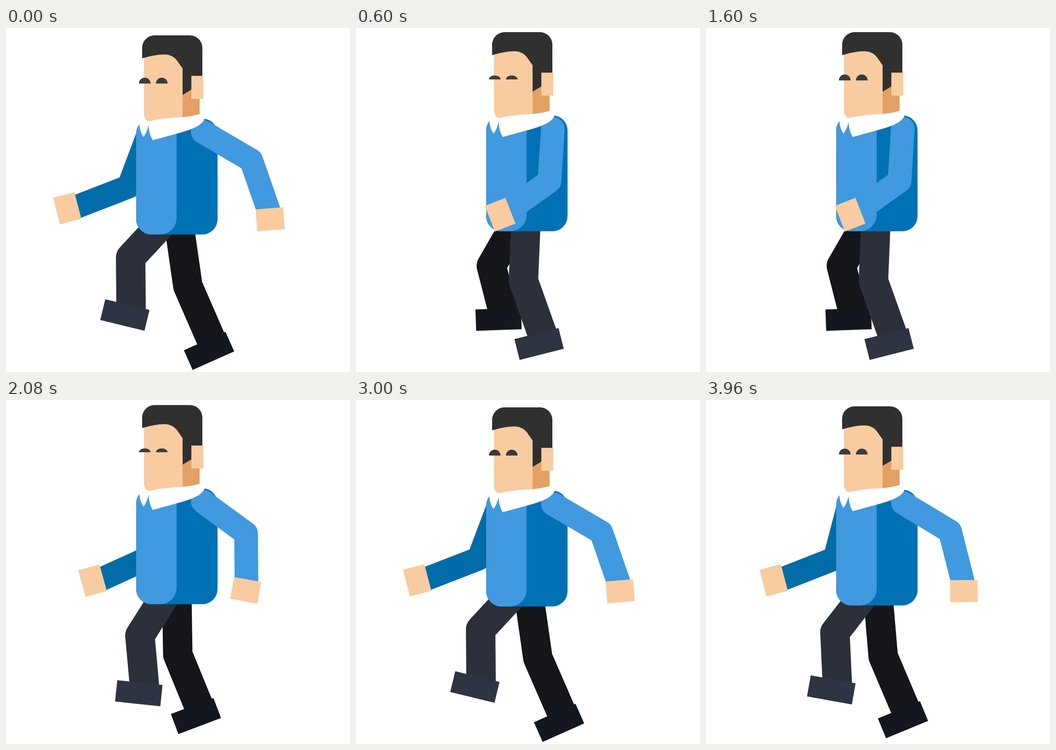
An HTML page for the animation above (4 s loop, 748 by 748 pixels).

```html
<!DOCTYPE html>
<html lang="en">
<head>
<meta charset="utf-8">
<title>Walk cycle</title>
<style>
  html, body { margin: 0; width: 100%; height: 100%; overflow: hidden; background: #fff; }
  svg { display: block; width: 100%; height: 100%; }
  .limb { fill: none; stroke-linejoin: round; }
  .leg { stroke-width: 64px; }
  .arm { stroke-width: 51.5px; stroke-linecap: round; }
  .skin { fill: #f8cca0; }
  .eye { fill: #3b3b3b; }
</style>
</head>
<body>
<svg viewBox="0 0 748 748">
  <path id="farArm" class="limb arm" stroke="#006da8"/>
  <rect id="farHand" class="skin" x="-30" y="-24" width="60" height="48"/>

  <path id="farLeg" class="limb leg" stroke="#15161a"/>
  <rect id="farFoot" x="-49.5" y="-23.3" width="99" height="46.6" fill="#131820"/>
  <path id="nearLeg" class="limb leg" stroke="#2b303b"/>
  <rect id="nearFoot" x="-49.5" y="-23.3" width="99" height="46.6" fill="#2f3442"/>

  <g id="torso">
    <rect x="283" y="197" width="177" height="252" rx="33" fill="#0071b5"/>
    <path fill="#4199df" d="M283 230a33 33 0 0 1 33-33H371V413a36 36 0 0 1-36 36H316a33 33 0 0 1-33-33Z"/>
  </g>

  <path id="nearArm" class="limb arm" stroke="#4199df"/>
  <rect id="nearHand" class="skin" x="-30" y="-24" width="60" height="48"/>

  <g id="head">
    <path fill="#e3a063" d="M382 120H421V192L382 200Z"/>
    <path class="skin" d="M300 50H384V198L312 206Q300 199 300 186Z"/>
    <path fill="#303030" d="M296 66V43a27 27 0 0 1 27-27H400a27 27 0 0 1 27 27V106H403V134L384 145.5V88L372 71Q362 57.5 344 57.5Q324 57.5 296 66Z"/>
    <rect class="skin" x="403" y="104" width="26" height="50"/>
    <g id="eyes">
      <path class="eye" d="M289 6.4a12.7 12.8 0 0 1 25.4 0Z"/>
      <path class="eye" d="M326 6.4a12.7 12.8 0 0 1 25.4 0Z"/>
    </g>
    <path fill="#fff" d="M300 196L309 203Q345 195 384 194Q405 192 421 187L431 195Q433 200 424 208Q412 219 372 229.5L319 244Q311 232 310 211Q307 226 299 237Q291 226 290 209Z"/>
  </g>
</svg>
<script>
const LOOP = 4000, CYCLE = 1000, STEP = 40;
const STRIDE = 480, BOB = 15, RAD = Math.PI / 180;

// Each limb swings between two extreme poses; feet and hands are x, y, degrees.
const legs = {
  near: { foot: [[258.5, 624, 13.5], [440, 706, -19]], knee: [[271, 499], [392, 560]] },
  far:  { foot: [[441.5, 702, -24], [270.5, 613, 8]], knee: [[395.4, 561], [264, 499]] }
};
const arms = {
  near: { shoulder: [428, 226], length: 114, angle: [59.6, -3.6], ease: 1.5,
          hand: [[574.5, 416, -4.5], [313.5, 406, 68.6]], wrist: -2 },
  far:  { shoulder: [312, 225], length: 120, angle: [-20.6, 64], ease: 0.9,
          hand: [[133, 392, 75.5], [403, 396, 71]], wrist: 2 }
};

const $ = id => document.getElementById(id);
const mix = (a, b, u) => a + (b - a) * u;
const blend = ([a, b], u) => a.map((v, i) => mix(v, b[i], u));

const line = (id, ...pts) =>
  $(id).setAttribute('d', 'M' + pts.map(p => p[0].toFixed(2) + ' ' + p[1].toFixed(2)).join('L'));
const place = (id, x, y, r = 0) =>
  $(id).setAttribute('transform', `translate(${x} ${y}) rotate(${r})`);

// Point given in the frame of a hand or foot.
function anchor([x, y, r], dx, dy) {
  const c = Math.cos(r * RAD), s = Math.sin(r * RAD);
  return [x + dx * c - dy * s, y + dx * s + dy * c];
}

function drawLeg(side, u, bob) {
  const foot = blend(legs[side].foot, u), knee = blend(legs[side].knee, u);
  const bow = Math.sin(Math.PI * u);
  foot[2] -= 4 * bow;
  knee[1] += 6 * bow;
  line(side + 'Leg', [371, 391 + bob], knee, anchor(foot, 14, 0));
  place(side + 'Foot', ...foot);
}

function drawArm(side, u, bob) {
  const { shoulder: [x, y], length, angle, ease, hand, wrist } = arms[side];
  const a = mix(...angle, u ** ease) * RAD;
  const upper = length + 8 * (1 - u) ** 5;
  const elbow = [x + upper * Math.sin(a), y + bob + upper * Math.cos(a)];
  const pose = blend(hand, u);
  line(side + 'Arm', [x, y + bob], elbow, anchor(pose, wrist, -20));
  place(side + 'Hand', ...pose);
}

function blink(t) {
  const gap = Math.abs((t + 100) % 1480 - 740);
  return Math.min(1, 0.1 + 0.9 * gap / 65);
}

function render(ms) {
  const time = Math.floor(ms % LOOP / STEP) * STEP;
  const t = time % CYCLE;
  const stride = Math.min(t / STRIDE, (CYCLE - t) / (CYCLE - STRIDE));
  // Arms rest briefly at both ends of their swing.
  const swing = Math.max(0, Math.min(t / 392, 1, (980 - t) / 380));
  const bob = -BOB * 2 * Math.min(stride, 1 - stride);
  for (const side of ['near', 'far']) {
    drawLeg(side, stride, bob);
    drawArm(side, swing, bob);
  }
  place('torso', 0, bob);
  place('head', 0, bob);
  $('eyes').setAttribute('transform', `translate(0 114.4) scale(1 ${blink(time)})`);
}

const start = performance.now();
function tick() {
  render(performance.now() - start);
  requestAnimationFrame(tick);
}
tick();
</script>
</body>
</html>
```
